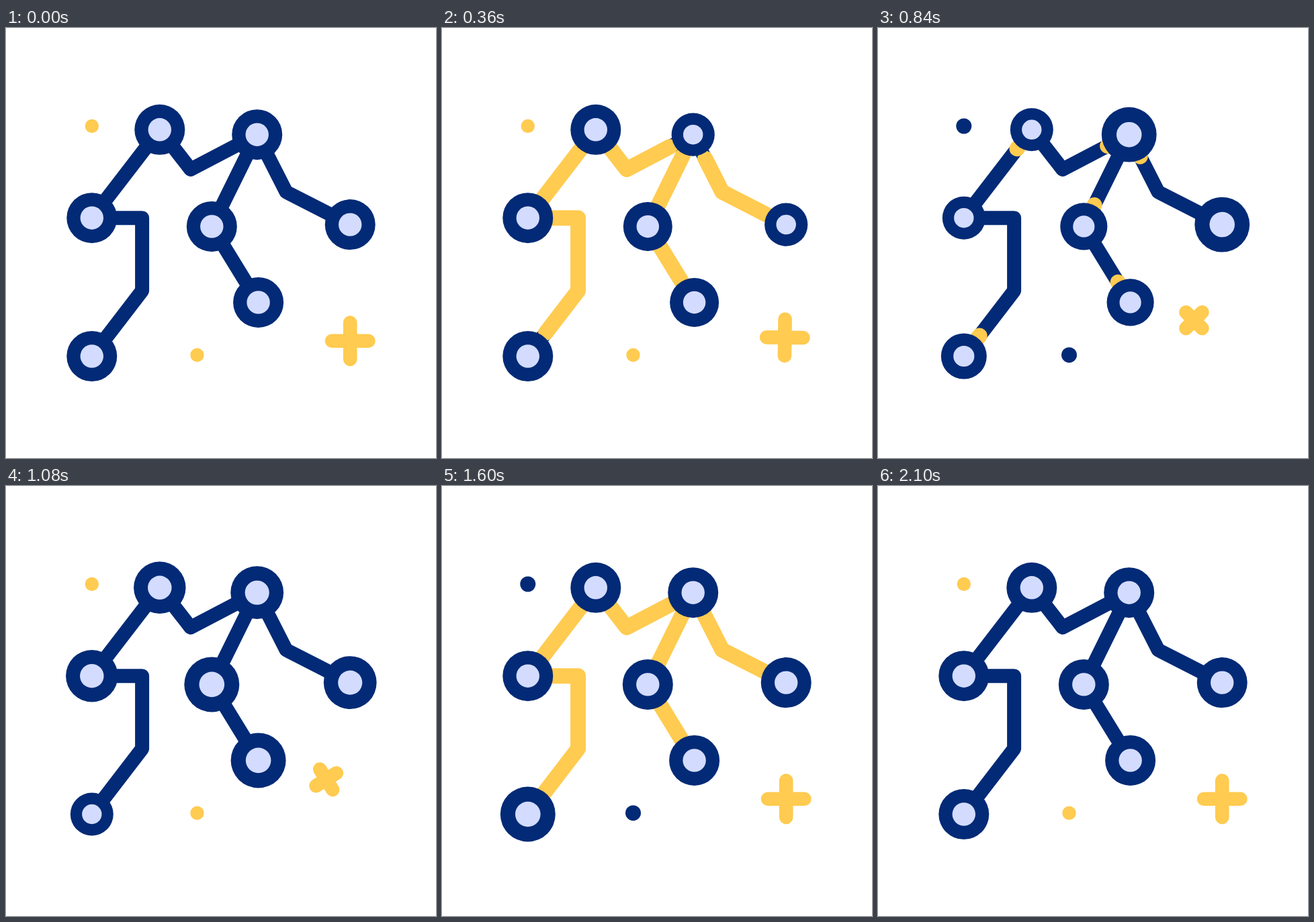
These frames come from a looping animation (640x640 px, 2400 ms). An HTML page:

```html
<!DOCTYPE html>
<html lang="en">
<head>
<meta charset="utf-8">
<title>Constellation</title>
<style>
  html, body { margin: 0; width: 100%; height: 100%; overflow: hidden; background: #fff; }
  svg { display: block; width: 100vw; height: 100vh; }
  path { fill: none; stroke-linecap: round; stroke-linejoin: round; }
</style>
</head>
<body>
<svg id="stage" viewBox="0 0 640 640"></svg>
<script>
const NAVY = '#032a76', YELLOW = '#ffcb50', LILAC = '#d3dcfe';
const LOOP = 2400;
const stage = document.getElementById('stage');

function add(tag, attrs, parent = stage) {
  const el = document.createElementNS('http://www.w3.org/2000/svg', tag);
  for (const key in attrs) el.setAttribute(key, attrs[key]);
  parent.append(el);
  return el;
}

const mix = (a, b, p) => a + (b - a) * p;

// Eased value through [time, value] stops
function track(t, stops) {
  for (let i = 1; i < stops.length; i++) {
    const [t0, a] = stops[i - 1], [t1, b] = stops[i];
    if (t < t1) {
      const u = Math.max(0, (t - t0) / (t1 - t0));
      return mix(a, b, u * u * (3 - 2 * u));
    }
  }
  return stops[stops.length - 1][1];
}

const A = [127.8, 488.5], B = [127.8, 282.7], C = [228.8, 151.3], D = [373.7, 158.7],
      E = [306.3, 295.4], F = [375.6, 408.4], G = [512.2, 292.6];

// Each route ends where its highlight leaves
const routes = [
  [B, [202.6, 282.7], [202.6, 391], A],
  [B, C],
  [C, [274.8, 210.5], D],
  [D, E],
  [E, F],
  [G, [417, 244], D],
];

function toward(from, to, distance) {
  const [dx, dy] = [to[0] - from[0], to[1] - from[1]];
  const k = distance / Math.hypot(dx, dy);
  return [from[0] + dx * k, from[1] + dy * k];
}

function inset(points) {
  const n = points.length;
  return [toward(points[0], points[1], 34), ...points.slice(1, -1),
          toward(points[n - 1], points[n - 2], 34)];
}

const line = points => 'M' + points.map(p => p.join(' ')).join('L');

routes.forEach(r => add('path', { d: line(r), stroke: NAVY, 'stroke-width': 21 }));
const glows = routes.map(r => {
  const el = add('path', { d: line(inset(r)), stroke: YELLOW, 'stroke-width': 23 });
  return { el, length: el.getTotalLength() };
});

// Pulse times: shrink from/to, grow from/to, settle from/to
const pulses = [
  { nodes: [D, G], times: [0, 395, 520, 860, 940, 1240] },
  { nodes: [E, F], times: [231, 708, 708, 1046, 1120, 1420] },
  { nodes: [B, C], times: [379, 855, 855, 1191, 1300, 1590] },
  { nodes: [A], times: [559, 1035, 1108, 1440, 1600, 1890] },
];
const SIZES = [1, 0.853, 0.853, 1.093, 1.093, 1];
const nodes = pulses.flatMap(({ nodes, times }) => nodes.map(([cx, cy]) => ({
  stops: times.map((time, i) => [time, SIZES[i]]),
  ring: add('circle', { cx, cy, fill: NAVY }),
  core: add('circle', { cx, cy, fill: LILAC }),
})));

const dots = [[127.8, 146], [284.5, 486.7]].map(([cx, cy]) => add('circle', { cx, cy }));
const plus = add('path', { stroke: YELLOW, 'stroke-width': 20.6 });

const HEAD = [[0, 0], [412, 1], [1690, 1], [2100, 0]];
const TAIL = [[477, 0], [873, 1], [1260, 1], [1608, 0]];
const TRAVEL = [[252, 0], [752, 1], [988, 1], [1488, 0]];
const TURN = [[325, 0], [800, 45], [905, 45], [1400, 90]];
const ARM = [[520, 27.2], [850, 17], [990, 17], [1490, 27.2]];

function along(p) {
  const bend = (a, b, c) => mix(mix(a, b, p), mix(b, c, p), p);
  return [bend(512.2, 506, 470.4), bend(465.8, 444, 435)];
}

function draw(t) {
  const head = track(t, HEAD), tail = track(t, TAIL);
  for (const { el, length } of glows) {
    const shown = head - tail;
    el.style.display = shown > 0.002 ? '' : 'none';
    el.setAttribute('stroke-dasharray', `${shown * length + 0.01} ${length * 3}`);
    el.setAttribute('stroke-dashoffset', -tail * length);
  }

  for (const { stops, ring, core } of nodes) {
    const size = track(t, stops);
    ring.setAttribute('r', 37.5 * size);
    core.setAttribute('r', 17.2 * size);
  }

  const dark = t < 2100 && Math.floor(t / 525) % 2 === 1;
  for (const dot of dots) {
    dot.setAttribute('r', dark ? 11.5 : 10.2);
    dot.setAttribute('fill', dark ? NAVY : YELLOW);
  }

  const arm = track(t, ARM);
  const [x, y] = along(track(t, TRAVEL));
  plus.setAttribute('d', `M${-arm} 0H${arm}M0 ${-arm}V${arm}`);
  plus.setAttribute('transform', `translate(${x} ${y}) rotate(${track(t, TURN)})`);
}

const start = performance.now();
function tick() {
  draw((performance.now() - start) % LOOP);
  requestAnimationFrame(tick);
}
tick();
</script>
</body>
</html>
```
